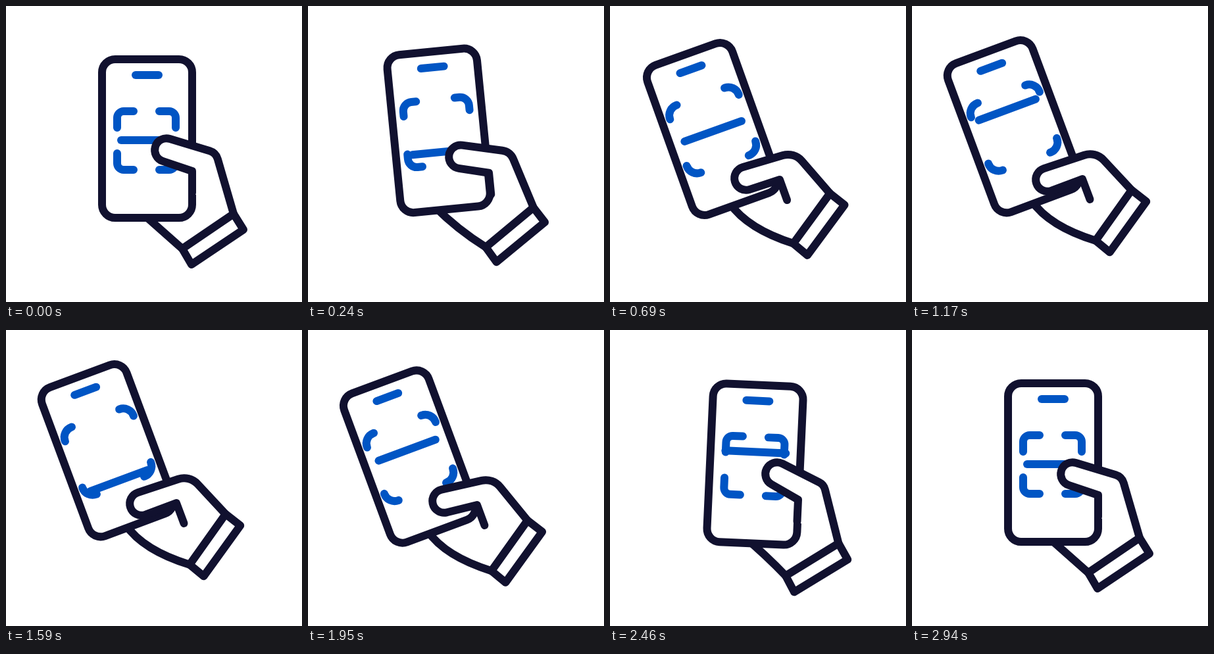
An HTML page with a canvas for the animation above (3090 ms loop, 450 by 450 pixels).

```html
<!DOCTYPE html>
<html lang="en">
<head>
<meta charset="utf-8">
<title>Phone scan</title>
<style>
html, body { margin: 0; width: 100%; height: 100%; overflow: hidden; background: #fff; }
canvas { display: block; width: 450px; height: 450px; }
</style>
</head>
<body>
<canvas id="stage" width="450" height="450"></canvas>
<script>
const ctx = document.getElementById('stage').getContext('2d');
const LOOP = 3090, REST = 2940;
const INK = '#11112f', BLUE = '#0055c4';

// phone x, y, angle | cuff x, y | knuckle x, y | thumb tip x, y | crease x, y | bracket spread
const rest = [214.5, 201.5, 0, 314.3, 354.5, 319, 223, 244, 219, 283, 251, 0];
const held = [154.3, 183.2, -20.4, 317.5, 327, 279, 221, 206, 264, 259, 263, 1];
const poses = [
  [0, ...rest],
  [450, 176.5, 179.6, -13.2, 316, 338.8, 292, 220, 217, 244.5, 265, 258, .97],
  [690, 155.5, 187, -19.7, 317.5, 331.8, 280, 222, 207, 262, 258, 264, 1],
  [1170, ...held],
  [1620, ...held],
  [1950, 154.3, 192.5, -20.3, 317.3, 336.5, 281, 225, 207, 260, 257, 266, 1],
  [2160, 172.5, 205, -14, 316.5, 352, 294, 237, 220, 258, 265, 272, .6],
  [2460, 220.5, 204, 2.6, 314, 361.3, 325, 235, 254, 219, 286, 258, 0],
  [REST, ...rest]
];
const scan = [[0, 2.5], [400, 49], [1000, -46], [1600, 49], [2200, -46], [2680, 2.5]];

const mix = (a, b, k) => a + (b - a) * k;

// Monotone cubic through column c of the keys
function track(keys, c, t) {
  const last = keys.length - 1;
  if (t >= keys[last][0]) return keys[last][c];
  const rate = i => (keys[i + 1][c] - keys[i][c]) / (keys[i + 1][0] - keys[i][0]);
  const slope = i => {
    if (i === 0 || i === last) return 0;
    const a = rate(i - 1), b = rate(i);
    return a * b > 0 ? 2 * a * b / (a + b) : 0;
  };
  let i = 0;
  while (t >= keys[i + 1][0]) i++;
  const span = keys[i + 1][0] - keys[i][0], u = (t - keys[i][0]) / span, v = 1 - u;
  return keys[i][c] * v * v * (1 + 2 * u) + keys[i + 1][c] * u * u * (3 - 2 * u)
    + span * u * v * (slope(i) * v - slope(i + 1) * u);
}

function shape(build, color, fill) {
  ctx.beginPath();
  build();
  if (fill) { ctx.fillStyle = '#fff'; ctx.fill(); }
  ctx.strokeStyle = color;
  ctx.stroke();
}

function bar(x, y, half) {
  shape(() => { ctx.moveTo(x - half, y); ctx.lineTo(x + half, y); }, BLUE);
}

function drawPhone(x, y, angle, spread, t) {
  ctx.save();
  ctx.translate(x, y);
  ctx.rotate(angle);
  shape(() => ctx.roundRect(-68.5, -120.5, 137, 241, 20), INK, true);
  bar(0, -96.5, 17.5);
  const cx = mix(-1, 0, spread), cy = mix(3, 2, spread);
  const w = mix(44.5, 55.5, spread), h = mix(44.5, 54.5, spread);
  const arm = mix(25, 17, spread), r = mix(10, 16.5, spread);
  for (const sx of [-1, 1]) for (const sy of [-1, 1]) shape(() => {
    const ex = cx + sx * w, ey = cy + sy * h;
    ctx.moveTo(ex, ey - sy * arm);
    ctx.arcTo(ex, ey, ex - sx * arm, ey, r);
    ctx.lineTo(ex - sx * arm, ey);
  }, BLUE);
  const grow = Math.max(0, Math.min(1, t / 400, (REST - t) / 400));
  bar(mix(-1, 0, grow), track(scan, 1, t), mix(38.5, 46, grow));
  ctx.restore();
}

function draw(t) {
  const [px, py, deg, wx, wy, kx, ky, tx, ty, cx, cy, spread] =
    rest.map((_, i) => track(poses, i + 1, t));
  const angle = deg * Math.PI / 180, tilt = -deg / 20;
  const cos = Math.cos(angle), sin = Math.sin(angle);
  const cuff = [[-46.3, 14.5], [31.7, -38.5], [46.7, -14.5], [-32.3, 38.5]]
    .map(([x, y]) => [wx + x * cos - y * sin, wy + x * sin + y * cos]);
  const [palm, back] = cuff;

  ctx.fillStyle = '#fff';
  ctx.fillRect(0, 0, 450, 450);
  ctx.lineWidth = 12;
  ctx.lineCap = ctx.lineJoin = 'round';

  shape(() => {
    const [x, y] = palm;
    ctx.moveTo(x, y);
    ctx.quadraticCurveTo(x + mix(-34, -70, tilt), y + mix(-30, -22, tilt),
      x + mix(-70, -97, tilt), y + mix(-62, -61, tilt));
  }, INK);

  drawPhone(px, py, angle, spread, t);

  // Knuckle, thumb and crease in front of the phone
  shape(() => {
    const r = 17.8;
    const tangent = (x, y, side) =>
      Math.atan2(y - ty, x - tx) + side * Math.acos(r / Math.hypot(x - tx, y - ty));
    const from = tangent(kx, ky, -1), to = tangent(cx, cy, 1);
    ctx.moveTo(...back);
    ctx.arcTo(kx, ky, tx + r * Math.cos(from), ty + r * Math.sin(from), mix(18, 28, tilt));
    ctx.arc(tx, ty, r, from, to, true);
    ctx.lineTo(cx, cy);
    ctx.lineTo(cx - 33 * sin, cy + 33 * cos);
  }, INK, true);

  shape(() => {
    cuff.forEach(p => ctx.lineTo(...p));
    ctx.closePath();
  }, INK, true);
}

const start = performance.now();
function frame() {
  draw((performance.now() - start) % LOOP);
  requestAnimationFrame(frame);
}
frame();
</script>
</body>
</html>
```
